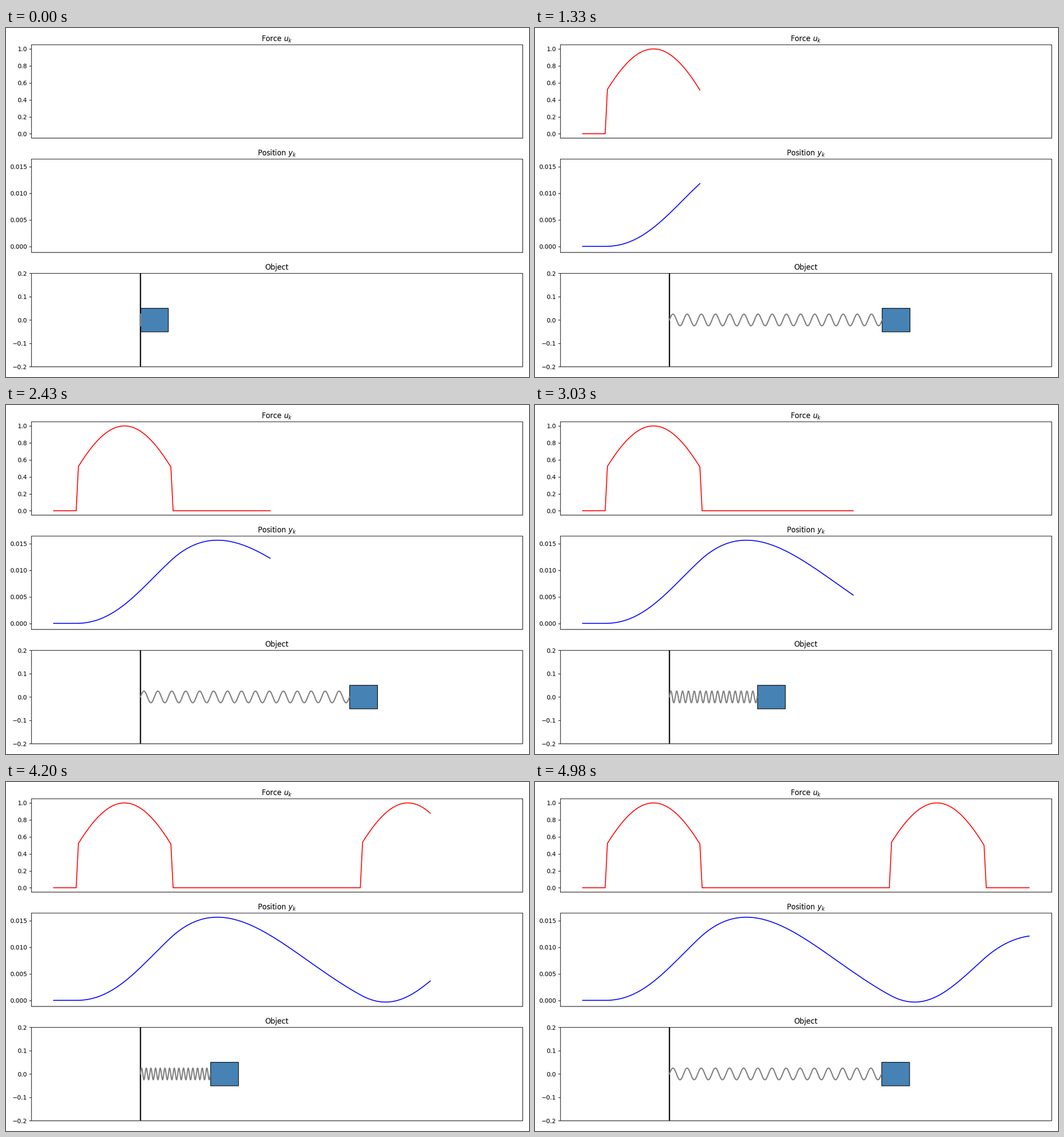
Recreate the animation shown at these times as a matplotlib script. Size 917 by 611 pixels, loop 5010 ms.

```python
import numpy as np
import matplotlib.pyplot as plt
from matplotlib.animation import FuncAnimation
from matplotlib.patches import Rectangle

W, H, DPI = 917, 611, 72        # stage; at 72 dpi one point is one pixel
BW, BH, BDPI = 1200, 800, 100   # layout grid, scaled down to the stage
S = W / BW * BDPI / DPI         # line width scale from layout to stage

LEFT, RIGHT, HEIGHT = 58, 1185, 214
TOPS = 38.2, 300.2, 562.2

STEPS, DT = 200, 0.05
MASS, DAMPING, STIFFNESS = 100, 50, 40


def simulate(force):
    """Mass-spring-damper response with the force held over each step."""
    a = np.array([[0, 1], [-STIFFNESS / MASS, -DAMPING / MASS]])
    state = np.zeros(2)
    out = []
    for f in force:
        term = DT * (a @ state + [0, f / MASS])
        for n in range(2, 7):
            state = state + term
            term = a @ term * DT / n
        out.append(state[0])
    return np.array(out)


def padded(lo, hi):
    pad = 0.05 * (hi - lo)
    return lo - pad, hi + pad


def add_panel(top, title, ticks, ylim):
    ax = fig.add_axes([LEFT / BW, 1 - (top + HEIGHT) / BH,
                       (RIGHT - LEFT) / BW, HEIGHT / BH])
    ax.set_title(title)
    ax.set_xticks([])
    ax.set_yticks(ticks)
    ax.set_xlim(*padded(0, STEPS - 2))
    ax.set_ylim(*ylim)
    return ax


def resize(width, height, dpi):
    fig.set_dpi(dpi)
    fig.set_size_inches(width / dpi, height / dpi)


def lanczos(n_out, n_in):
    """Weights that shrink n_in samples to n_out."""
    centre = (np.arange(n_out)[:, None] + 0.5) * n_in / n_out
    x = (np.arange(n_in) + 0.5 - centre) * n_out / n_in
    w = np.where(abs(x) < 3, np.sinc(x) * np.sinc(x / 3), 0)
    return w / w.sum(axis=1, keepdims=True)


def snap(v):
    """Centre of the layout pixel that a thin edge falls on."""
    return np.floor(v + 0.5) + 0.5


step = np.arange(STEPS)
wave = np.sin(DT * step)
force = np.where(wave > 0.5, wave, 0)
pos = simulate(force)
low, high = pos.min(), pos.max()

fig = plt.figure(figsize=(W / DPI, H / DPI), dpi=DPI, facecolor="white")
ax_u = add_panel(TOPS[0], "Force $u_k$", np.arange(6) / 5, padded(0, 1))
ax_y = add_panel(TOPS[1], "Position $y_k$", np.arange(4) * 0.005,
                 padded(low, high))
ax_m = add_panel(TOPS[2], "Object", np.arange(-2, 3) / 10, (-0.2, 0.2))

# Render the still parts once, smooth them down and reuse as a backdrop.
resize(BW, BH, BDPI)
fig.canvas.draw()
still = np.array(fig.canvas.buffer_rgba())[..., :3].astype(float)
still = np.einsum("yh,hwc->ywc", lanczos(H, BH), still, optimize=True)
still = np.einsum("xw,ywc->yxc", lanczos(W, BW), still, optimize=True)
resize(W, H, DPI)
for ax in (ax_u, ax_y, ax_m):
    ax.set_axis_off()
    ax.title.set_visible(False)
fig.figimage(np.clip(still + 0.5, 0, 255).astype(np.uint8), zorder=-1)

u_line, = ax_u.plot([], [], "r", lw=1.5 * S, snap=False)
y_line, = ax_y.plot([], [], "b", lw=1.5 * S, snap=False)

# The object is placed in layout pixels, y pointing down.
stage = fig.add_axes([0, 0, 1, 1])
stage.set_axis_off()
stage.set_xlim(0, BW)
stage.set_ylim(BH, 0)

unit = (RIGHT - LEFT) / (1.8 * high)
wall_x = LEFT + 0.4 * high * unit
mid = TOPS[2] + HEIGHT / 2
box_top, box_base = snap(mid - HEIGHT / 8), snap(mid + HEIGHT / 8)
mass_x = wall_x + unit * pos
box_l = snap(mass_x)
box_r = snap(mass_x + unit * 0.1 * (high - low))

stage.plot([snap(wall_x)] * 2, [TOPS[2], TOPS[2] + HEIGHT], "k", lw=2 * S,
           solid_capstyle="butt", snap=False)
spring, = stage.plot([], [], color="gray", lw=2 * S, snap=False)
box = stage.add_patch(Rectangle((0, box_top), 0, box_base - box_top,
                                fc="steelblue", ec="black", lw=S, snap=False))

coil = np.linspace(0, 1, 500)
coil_y = mid - HEIGHT / 16 * np.sin(2 * np.pi * 15 * coil)


def update(i):
    k = min(2 * i // 5, STEPS - 1)      # one step every 25 ms
    u_line.set_data(step[:k], force[:k])
    y_line.set_data(step[:k], pos[:k])
    spring.set_data(wall_x + coil * unit * pos[k], coil_y)
    box.set_x(box_l[k])
    box.set_width(box_r[k] - box_l[k])
    return u_line, y_line, spring, box


anim = FuncAnimation(fig, update, frames=501, interval=10, repeat=True,
                     repeat_delay=0, init_func=lambda: update(0))
plt.show()
```
